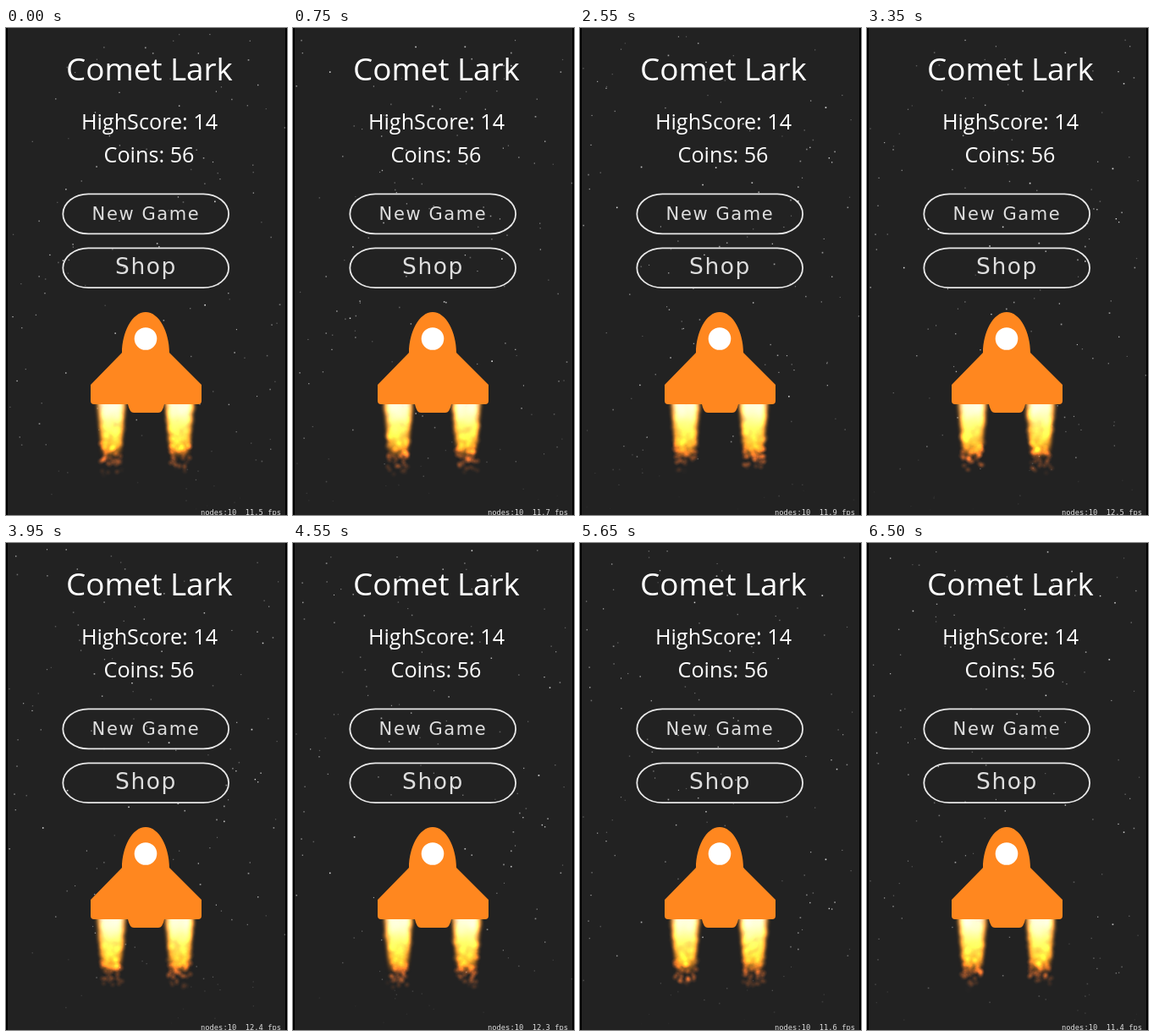
An HTML page with a canvas that plays this animation: 332 px wide and 576 px high, repeating every 6.55 s.

```html
<!DOCTYPE html>
<html lang="en">
<head>
<meta charset="utf-8">
<title>Comet Lark</title>
<style>
  html, body { margin: 0; width: 100%; height: 100%; overflow: hidden; background: #222; }
  canvas, svg { position: absolute; left: 0; top: 0; width: 332px; height: 576px; }
  text { fill: #fff; text-anchor: middle; font-family: "Open Sans", "Noto Sans", sans-serif; }
  .score { font-size: 25.2px; }
  .button rect { fill: none; stroke: #e8e8e8; stroke-width: 1.8; }
  .button text { fill: #dedede; font-family: "DejaVu Sans", sans-serif; }
  .ship { filter: blur(.5px); }
  #stats { font: 8.77px "DejaVu Sans Mono", monospace; text-anchor: start; white-space: pre; fill: #ddd; }
</style>
</head>
<body>
<canvas id="sky" width="332" height="576"></canvas>
<svg viewBox="0 0 332 576">
  <text x="169.5" y="62" font-size="36.8">Comet Lark</text>
  <text class="score" x="169.5" y="120">HighScore: 14</text>
  <text class="score" x="169" y="158.5">Coins: 56</text>
  <g class="button">
    <rect x="67.3" y="196.4" width="195.8" height="47" rx="30" ry="23.5"/>
    <text x="165.5" y="227" font-size="21" letter-spacing="1.6">New Game</text>
    <rect x="67.3" y="260.4" width="195.8" height="46.8" rx="30" ry="23.4"/>
    <text x="165.5" y="291" font-size="26.5" letter-spacing="1.6">Shop</text>
  </g>
  <g class="ship">
    <path fill="#ff871f" d="M165 336C149 336 137 360 137 384L100 422V441Q100 445 104 445H144
      Q146 455 151 455H180Q185 455 187 445H227Q231 445 231 441V422L193 384C193 360 181 336 165 336Z"/>
    <circle cx="165" cy="367.5" r="13.3" fill="#fff"/>
  </g>
  <path d="M0 0H2V576H0ZM330 0H332V576H330Z" fill="#000"/>
  <text id="stats" x="230" y="576"></text>
</svg>
<script>
const W = 332, H = 576, LOOP = 6550, STEP = 50;
const ctx = document.getElementById("sky").getContext("2d");
const stats = document.getElementById("stats");

// Start time in ms and the rate shown from then on
const rates = [[0, 11.5], [700, 11.7], [1400, 11.8], [2100, 11.9], [3000, 12.5],
  [3700, 12.4], [4400, 12.3], [5100, 11.9], [5600, 11.6], [6200, 11.4]];

const rand = n => {
  const v = Math.sin(n * 127.1 + 31.7) * 43758.5453;
  return v - Math.floor(v);
};

// Stars are born in small batches along the top and fall at nearly one speed
const STARS = { top: 7, speed: 90, batch: 84, perBatch: 2 };

function drawStars(t) {
  const { top, speed, batch, perBatch } = STARS;
  const newest = Math.floor(t / batch);
  const oldest = newest - Math.ceil((H - top) / speed * 1000 / batch);
  ctx.fillStyle = "#fff";
  for (let b = oldest; b <= newest; b++) {
    for (let j = 0; j < perBatch; j++) {
      const id = b * perBatch + j + 1000;
      const y = top + (t - b * batch) / 1000 * speed * (0.97 + rand(id + 0.2) * 0.06);
      const size = 1.1 + rand(id + 0.4) * 0.6;
      const fade = Math.min(1, (H - y) / 150);
      if (fade <= 0) continue;
      ctx.globalAlpha = (0.25 + rand(id + 0.7) ** 2 * 0.6) * fade;
      ctx.fillRect(2 + rand(id) * 327, y, size, size);
    }
  }
  ctx.globalAlpha = 1;
}

function makeGlow(rgb) {
  const c = document.createElement("canvas");
  c.width = c.height = 32;
  const g = c.getContext("2d");
  const fill = g.createRadialGradient(16, 16, 0, 16, 16, 16);
  fill.addColorStop(0, `rgba(${rgb},1)`);
  fill.addColorStop(0.45, `rgba(${rgb},.5)`);
  fill.addColorStop(1, `rgba(${rgb},0)`);
  g.fillStyle = fill;
  g.fillRect(0, 0, 32, 32);
  return c;
}
const hot = makeGlow("255,140,30"), ember = makeGlow("215,85,14");

function glow(sprite, x, y, r, alpha) {
  ctx.globalAlpha = alpha;
  ctx.drawImage(sprite, x - r, y - r, r * 2, r * 2);
}

function fade(...stops) {
  const g = ctx.createLinearGradient(0, 446, 0, 508);
  stops.forEach(([at, color]) => g.addColorStop(at, color));
  return g;
}
const rim = fade([0, "#ff9a2a"], [0.7, "rgba(255,140,30,.9)"], [1, "rgba(225,95,15,0)"]);
const core = fade([0, "#fff6dc"], [0.2, "#fff0b0"], [0.4, "#ffe266"],
  [0.75, "rgba(255,200,50,.85)"], [1, "rgba(255,150,30,0)"]);

function plume(cx, top, bottom, fill, blur) {
  ctx.filter = `blur(${blur}px)`;
  ctx.fillStyle = fill;
  ctx.beginPath();
  ctx.moveTo(cx - top, 438);
  ctx.lineTo(cx + top, 438);
  ctx.lineTo(cx + bottom, 508);
  ctx.lineTo(cx - bottom, 508);
  ctx.fill();
}

function drawFlame(cx, seed, t) {
  ctx.save();
  plume(cx, 17.5, 10.5, rim, 2);
  plume(cx, 14, 8, core, 2.5);
  ctx.filter = "none";
  ctx.globalCompositeOperation = "lighter";
  const gap = 8, life = 900;
  const last = Math.floor(t / gap);
  for (let k = last - Math.floor(life / gap); k <= last; k++) {
    const id = k + seed;
    const p = (t - k * gap) / (life * (0.75 + rand(id + 0.3) * 0.25));
    if (p >= 1) continue;
    const x = cx + (rand(id) - 0.5) * 29 * (1 - 0.2 * p) + Math.sin(id + p * 5) * 1.5 * p;
    const y = 447 + p * (68 + rand(id + 0.6) * 14);
    if (p < 0.62) glow(hot, x, y, 8 - p * 5, 0.16);
    else glow(ember, x, y, 6 - p * 2, 0.75 * (1 - p) ** 0.5);
  }
  ctx.restore();
}

function render(t) {
  ctx.fillStyle = "#222";
  ctx.fillRect(0, 0, W, H);
  drawStars(t);
  drawFlame(124.5, 1000, t);
  drawFlame(205, 5000, t);
  const rate = rates.filter(([start]) => start <= t).pop()[1];
  stats.textContent = `nodes:10  ${rate.toFixed(1)} fps`;
}

const begin = performance.now();
let shown = -1;
function tick() {
  const elapsed = (performance.now() - begin) % LOOP;
  const t = Math.floor(elapsed / STEP) * STEP;
  if (t !== shown) render(shown = t);
  requestAnimationFrame(tick);
}
tick();
</script>
</body>
</html>
```
